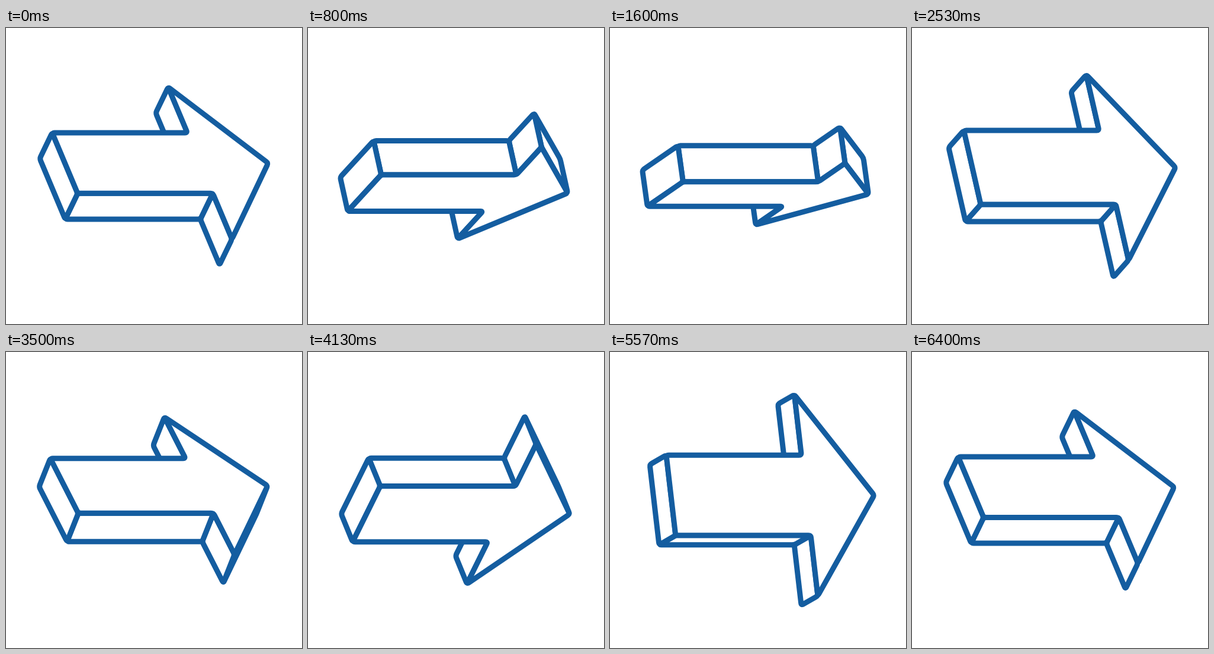
An HTML page that plays this animation: 500 px wide and 500 px high, repeating every 6.46 s.

```html
<!DOCTYPE html>
<html lang="en">
<head>
<meta charset="utf-8">
<title>Spinning arrow</title>
<style>
  html, body { margin: 0; width: 100%; height: 100%; overflow: hidden; background: #fff; }
  svg { display: block; width: 100%; height: 100%; }
  path { fill: #fff; stroke: #145da0; stroke-width: 9; stroke-linejoin: round; }
</style>
</head>
<body>
<svg viewBox="0 0 500 500"><g id="arrow"></g></svg>
<script>
const LOOP = 6460, CYCLE = 3240, SPIN = 3200, START_ANGLE = 43;
const EASE_OUT = 0.363, EASE_IN = 0.372;
const DEPTH = 64, SKEW = 0.45, CENTER_Y = 250, CORNER = 4;
const TAIL = 89, NECK = 317.3, TIP = 432.3, SHAFT = 70, HEAD = 175.5;

// Outline of the flat arrow, clockwise from the upper tail corner.
const outline = [
  [TAIL, -SHAFT], [NECK, -SHAFT], [NECK, -HEAD], [TIP, 0],
  [NECK, HEAD], [NECK, SHAFT], [TAIL, SHAFT]
];
// Side faces from far to near: slants, shoulders, shaft, tail end.
const sideOrder = [2, 3, 1, 4, 0, 5, 6];

const arrow = document.getElementById('arrow');
const paths = Array.from({ length: sideOrder.length + 1 }, () =>
  arrow.appendChild(document.createElementNS('http://www.w3.org/2000/svg', 'path')));

// Ease along cubic-bezier(EASE_OUT, 0, EASE_IN, 1).
function ease(x) {
  let low = 0, high = 1;
  for (let i = 0; i < 30; i++) {
    const s = (low + high) / 2, r = 1 - s;
    if (3 * r * s * (r * EASE_OUT + s * EASE_IN) + s ** 3 < x) low = s; else high = s;
  }
  return low * low * (3 - 2 * low);
}

function project([x, y], z, angle) {
  const sin = Math.sin(angle), cos = Math.cos(angle);
  return [x + SKEW * (y * sin - z * cos), CENTER_Y + y * cos + z * sin];
}

// The point a corner's length away from one vertex toward another.
function step(from, to) {
  const length = Math.hypot(to[0] - from[0], to[1] - from[1]);
  const share = Math.min(CORNER / length, 0.5);
  return from.map((n, i) => n + (to[i] - n) * share);
}

// Closed polygon with slightly rounded corners.
function toPath(points) {
  const text = p => p.map(n => n.toFixed(2)).join(' ');
  const count = points.length;
  return points.map((p, i) => {
    const enter = step(p, points[(i + count - 1) % count]);
    const leave = step(p, points[(i + 1) % count]);
    return `${i ? 'L' : 'M'}${text(enter)}Q${text(p)} ${text(leave)}`;
  }).join('') + 'Z';
}

function isVisible([a, b, , d]) {
  return (b[0] - a[0]) * (d[1] - a[1]) - (b[1] - a[1]) * (d[0] - a[0]) < 0;
}

function draw(angle) {
  const front = outline.map(p => project(p, -DEPTH / 2, angle));
  const back = outline.map(p => project(p, DEPTH / 2, angle));
  sideOrder.forEach((edge, i) => {
    const next = (edge + 1) % outline.length;
    const face = [front[edge], front[next], back[next], back[edge]];
    paths[i].setAttribute('d', isVisible(face) ? toPath(face) : '');
  });
  paths[sideOrder.length].setAttribute('d', toPath(Math.cos(angle) > 0 ? front : back));
}

// Poses advance at 25 per second, shown on a 30 Hz clock.
function poseTime(ms) {
  const tick = Math.floor((ms + 4) * 0.03);
  return Math.floor(tick * 5 / 6) * 40;
}

const begin = performance.now();
function render(now) {
  const time = poseTime(Math.max(0, now - begin) % LOOP);
  const turn = ease(Math.min(1, time % CYCLE / SPIN));
  draw((START_ANGLE + 360 * turn) * Math.PI / 180);
  requestAnimationFrame(render);
}
render(begin);
</script>
</body>
</html>
```
